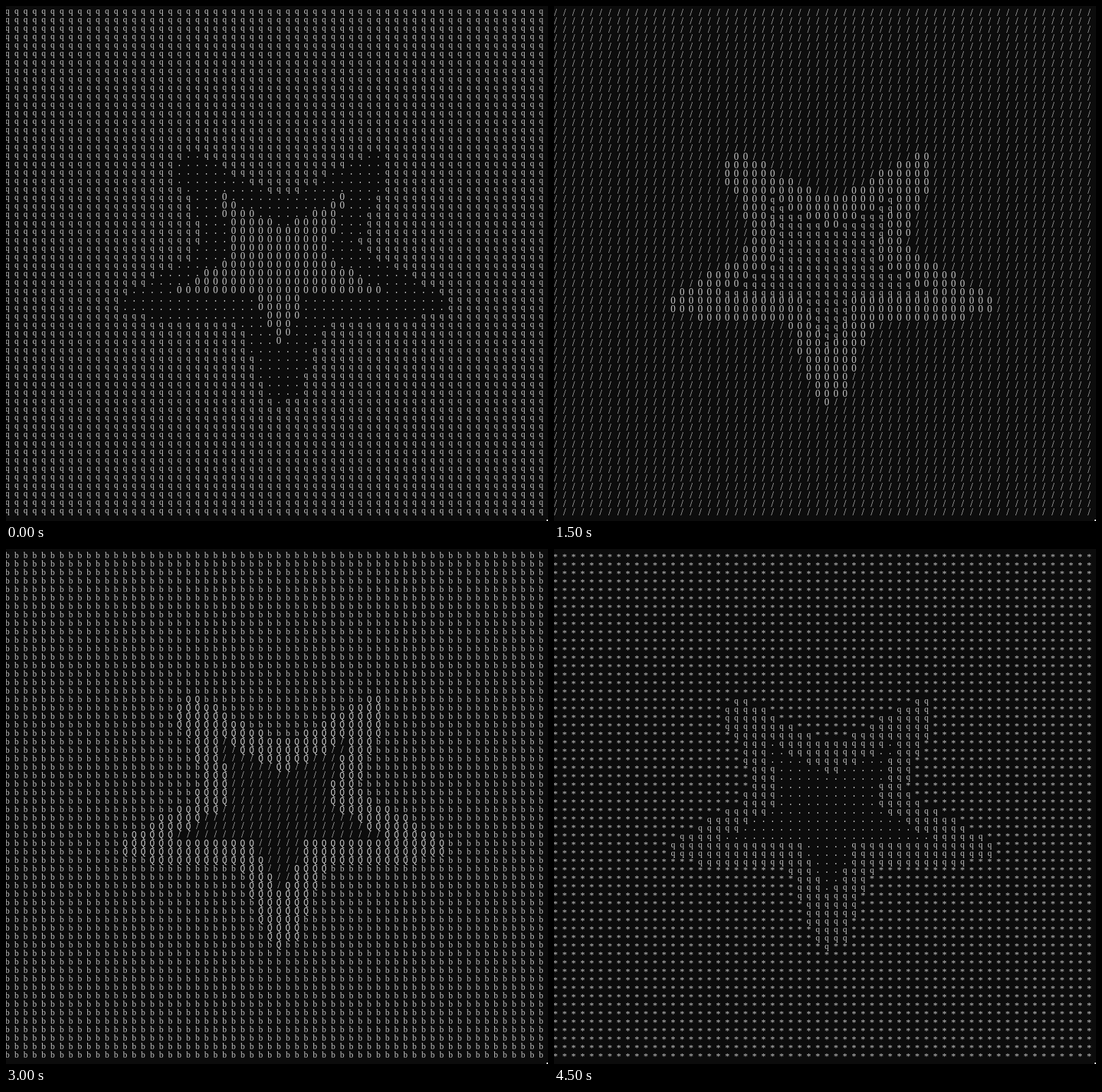
Recreate the animation shown at these times as an HTML page with a canvas. Size 767x730 px, loop 5 s.

```html
<!DOCTYPE html>
<html lang="en">
<head>
<meta charset="utf-8">
<title>Character star</title>
<style>
  html, body { margin: 0; width: 100%; height: 100%; overflow: hidden; background: #0c0c0c; }
  canvas { display: block; }
</style>
</head>
<body>
<canvas id="stage" width="767" height="730"></canvas>
<script>
const ctx = document.getElementById('stage').getContext('2d');

const GRID = 60, LEFT = 2.1, COL = 12.8, ROW = 12, STEP = 500;

// Outlines in grid units; a cell belongs to a shape when its point lies inside.
const STAR = new Path2D(`M19.6 16.7 L20.9 16.7 28.9 21.3 31.9 21.3 39.9 16.7 41.5 16.7
  41.1 21.05 38.6 27 40.6 29 48.5 33.6 48.1 35.1 45.2 36.1 35.2 36.5 32.2 45.2 30.4 46.2
  29.7 46.2 28.65 45.2 25.8 36.5 15.7 36.1 12.6 35.1 12.6 33.6 20.2 29 21.75 27 19.7 21
  18.6 20 18.8 18Z`);
const CORE = new Path2D(`M23.5 21.7 L30.45 25.4 37.36 21.8 35.25 28.9 41.4 33.1 41.4 33.4
  32.9 33.5 32.1 36.1 30.45 39.2 29.8 39.2 27.35 33.5 18.3 33.3 24.7 29.1Z`);

// Field, star and core characters, then the baseline of the first row.
const POSES = [
  ['q', '.', '0', 11.4],
  ['b', '.', 'q', 13],
  ['*', '.', 'q', 15],
  ['/', '0', 'q', 13.6],
  ['q', '0', 'q', 11],
  ['q', '0', '/', 13.4],
  ['b', 'Q', '/', 13.4],
  ['/', 'Q', 'E', 16],
  ['*', 'Q', '.', 15],
  ['*', 'q', '.', 15]
];

const SERIF = '"Liberation Serif", serif';
const MONO = '"Liberation Mono", monospace';
const FONTS = {
  q: `12px ${SERIF}`, b: `12px ${SERIF}`, '*': `13px ${SERIF}`, '.': `12px ${MONO}`,
  '/': `14px ${SERIF}`, 0: `14px ${SERIF}`, Q: `12px ${MONO}`, E: `13px ${MONO}`
};

const field = [], star = [], core = [];
for (let row = 0; row < GRID; row++) {
  for (let col = 0; col < GRID; col++) {
    const layer = ctx.isPointInPath(CORE, col, row) ? core
      : ctx.isPointInPath(STAR, col, row) ? star : field;
    layer.push([LEFT + col * COL, row * ROW]);
  }
}

function fillLayer(cells, char, baseline) {
  ctx.font = FONTS[char];
  for (const [x, y] of cells) ctx.fillText(char, x, y + baseline);
}

function draw([fieldChar, starChar, coreChar, baseline]) {
  ctx.fillStyle = '#0c0c0c';
  ctx.fillRect(0, 0, 767, 730);
  ctx.fillStyle = '#c8c8c8';
  ctx.textAlign = 'center';
  fillLayer(field, fieldChar, baseline);
  fillLayer(star, starChar, baseline);
  fillLayer(core, coreChar, baseline);
  ctx.fillStyle = '#fff';
  ctx.fillRect(765, 728, 2, 2);
}

const start = performance.now();
let shown = -1;
function tick() {
  const pose = Math.floor((performance.now() - start) / STEP) % POSES.length;
  if (pose !== shown) draw(POSES[shown = pose]);
  requestAnimationFrame(tick);
}
tick();
</script>
</body>
</html>
```
